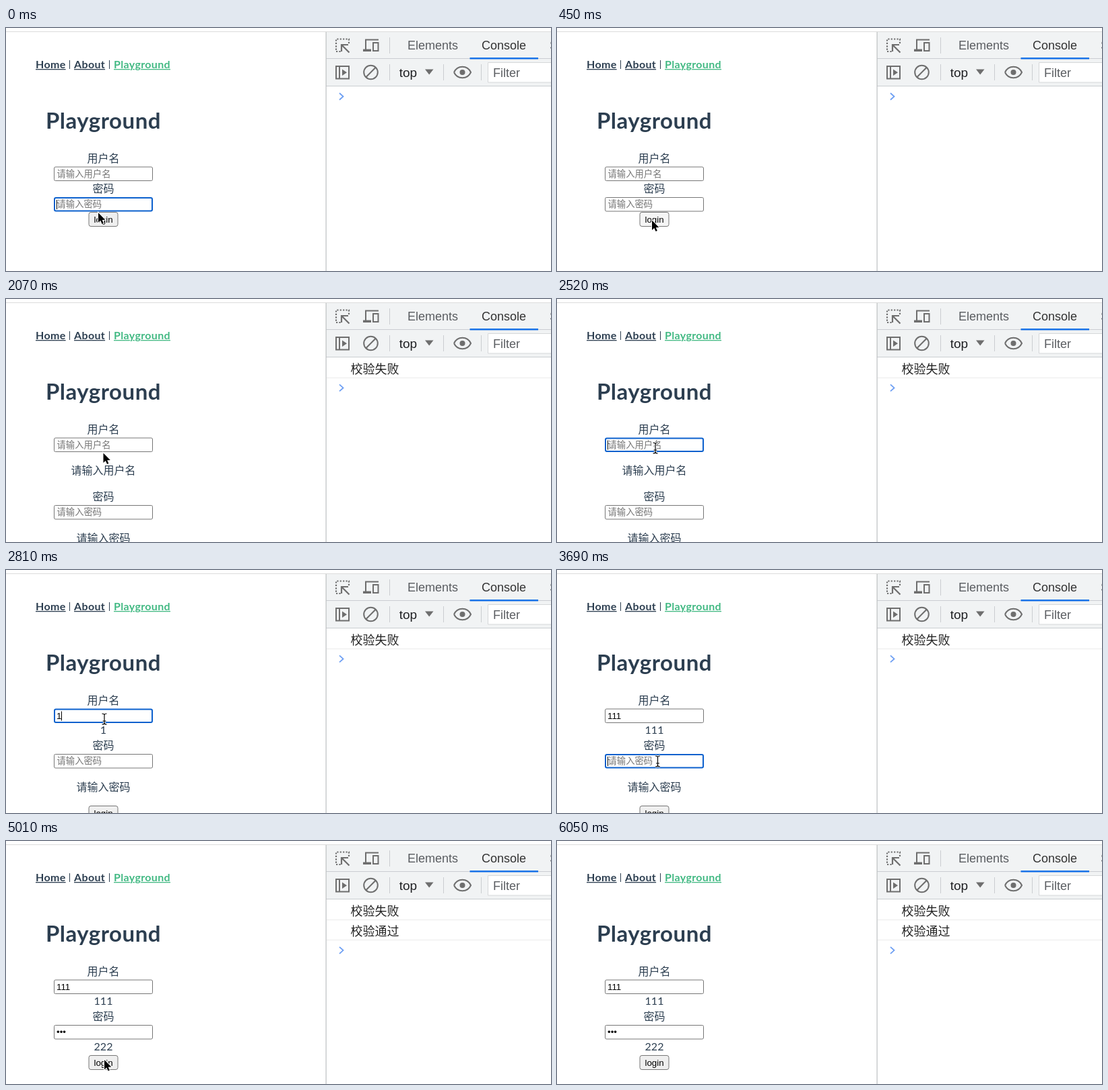
Animation, 809 px wide and 362 px high, one loop 6.8 s. Source, as an HTML page with a canvas:

```html
<!DOCTYPE html>
<html lang="zh">
<head>
<meta charset="utf-8">
<title>Playground</title>
<style>
  html, body { margin: 0; width: 100%; height: 100%; overflow: hidden; background: #fff; }
  canvas { display: block; width: 809px; height: 362px; }
</style>
</head>
<body>
<canvas id="stage"></canvas>
<script>
const W = 809, H = 362, LOOP = 6800;
const canvas = document.getElementById('stage');
const ratio = window.devicePixelRatio || 1;
canvas.width = W * ratio;
canvas.height = H * ratio;
const ctx = canvas.getContext('2d');

const CJK = '"Noto Sans CJK SC", "Noto Sans CJK", sans-serif';
const UI = '"Liberation Sans", Arial, sans-serif';
const PAGE = 'Lato, "Noto Sans CJK SC", sans-serif';
const INK = '#2c3e50', GREEN = '#42b983', ICON = '#6e6e6e';
const MID = 144.5;

// Each entry changes part of the state at its time (ms).
const steps = [
  [0, { x: 137, y: 275.3, cursor: 'arrow', focus: 2, pressed: false, user: '', pass: '', errors: false, logs: 0 }],
  [150, { x: 139, y: 281 }],
  [300, { x: 141, y: 286.5 }],
  [450, { focus: 0, pressed: true }],
  [590, { errors: true, logs: 1, pressed: false }],
  [1490, { x: 143.5 }],
  [1780, { x: 144, y: 271 }],
  [1930, { x: 144.5, y: 241 }],
  [2070, { y: 229.5 }],
  [2220, { x: 146, y: 223, cursor: 'beam' }],
  [2370, { focus: 1 }],
  [2520, { y: 222 }],
  [2810, { user: '1' }],
  [3110, { user: '11' }],
  [3260, { user: '111' }],
  [3400, { x: 148, y: 246 }],
  [3550, { x: 149.5, y: 281 }],
  [3690, { y: 285, focus: 2 }],
  [3990, { pass: '2' }],
  [4140, { pass: '22' }],
  [4290, { pass: '222' }],
  [4440, { y: 302 }],
  [4580, { x: 148, y: 314, cursor: 'arrow' }],
  [4730, { x: 146, y: 326 }],
  [4870, { focus: 0, pressed: true }],
  [5010, { logs: 2, pressed: false }],
  [5460, { x: 178, y: 333 }],
  [5600, { x: 335, y: 327 }],
  [5750, { x: 492, y: 306 }],
  [5900, { x: 580, y: 292 }],
  [6050, { cursor: '' }]
];

function stateAt(time) {
  return Object.assign({}, ...steps.filter(s => s[0] <= time).map(s => s[1]));
}

function text(str, x, y, font, color, align = 'left') {
  ctx.font = font;
  ctx.fillStyle = color;
  ctx.textAlign = align;
  ctx.fillText(str, x, y);
}

function rect(x, y, w, h, color) {
  ctx.fillStyle = color;
  ctx.fillRect(x, y, w, h);
}

function path(points, close) {
  ctx.beginPath();
  points.forEach(([x, y], i) => i ? ctx.lineTo(x, y) : ctx.moveTo(x, y));
  if (close) ctx.closePath();
}

function stroke(color, width) {
  ctx.strokeStyle = color;
  ctx.lineWidth = width;
  ctx.stroke();
}

function line(points, color, width) {
  path(points);
  stroke(color, width);
}

function shape(points, color) {
  path(points, true);
  ctx.fillStyle = color;
  ctx.fill();
}

function circle(x, y, r) {
  ctx.beginPath();
  ctx.arc(x, y, r, 0, Math.PI * 2);
}

function box(x, y, w, h, r, fill, border, width) {
  const d = width / 2;
  ctx.beginPath();
  ctx.roundRect(x + d, y + d, w - width, h - width, r);
  ctx.fillStyle = fill;
  ctx.fill();
  stroke(border, width);
}

function link(str, x, color) {
  ctx.font = 'bold 16px ' + PAGE;
  ctx.letterSpacing = '0.35px';
  ctx.textAlign = 'left';
  rect(x, 61, ctx.measureText(str).width, 1.3, color);
  // Leave a gap in the underline around descenders.
  ctx.strokeStyle = '#fff';
  ctx.lineWidth = 2;
  ctx.strokeText(str, x, 60);
  text(str, x, 60, ctx.font, color);
  ctx.letterSpacing = '0px';
}

function title(str) {
  ctx.letterSpacing = '0.5px';
  text(str, MID, 150, 'bold 33px ' + PAGE, INK, 'center');
  ctx.letterSpacing = '0px';
}

function input(y, value, hint, focused) {
  const font = '13.333px ' + UI;
  box(71, y, 147, 21.5, 2, '#fff', focused ? '#0b60cd' : '#767676', focused ? 2 : 1);
  if (value) text(value, 75, y + 15.3, font, '#000');
  else text(hint, 75.5, y + 15.4, '13.333px ' + CJK, '#757575');
  if (focused) {
    ctx.font = font;
    rect(Math.round(75 + ctx.measureText(value).width), y + 4, 1, 14, '#000');
  }
}

// Draws the line under a field and returns the height it takes.
function message(y, value, hint, errors) {
  if (value) {
    text(value, MID, y + 16.3, '16px ' + PAGE, INK, 'center');
    return 22.3;
  }
  if (!errors) return 0;
  text(hint, MID, y + 33.3, '16px ' + CJK, INK, 'center');
  return 55;
}

function loginButton(y, pressed) {
  box(122.5, y, 44, 22, 3, pressed ? '#f5f5f5' : '#efefef', '#767676', 1);
  text('login', MID, y + 15.8, '13.333px ' + UI, '#000', 'center');
}

function drawPage(s) {
  link('Home', 44, INK);
  link('About', 101, INK);
  link('Playground', 160, GREEN);
  rect(94, 48, 1, 13, INK);
  rect(153, 48, 1, 13, INK);
  title('Playground');

  const label = (str, y) => text(str, MID, y, '16px ' + CJK, INK, 'center');
  label('用户名', 200);
  input(206.5, s.user, '请输入用户名', s.focus === 1);
  let y = message(228, s.user, '请输入用户名', s.errors);
  label('密码', 245 + y);
  input(Math.round(252 + y), '•'.repeat(s.pass.length), '请输入密码', s.focus === 2);
  y += message(273.5 + y, s.pass, '请输入密码', s.errors);
  loginButton(Math.round(274 + y), s.pressed);
}

function inspectIcon() {
  ctx.setLineDash([2.2, 2.2]);
  line([[509, 23], [509, 16.5], [490, 16.5], [490, 35], [497, 35]], ICON, 2.2);
  ctx.setLineDash([]);
  line([[508, 25], [498, 25], [498, 35]], ICON, 2.2);
  line([[498, 25], [509.5, 36.5]], ICON, 2.2);
}

function deviceIcon() {
  line([[553, 17.5], [534, 17.5], [534, 32]], ICON, 2);
  rect(530, 31.5, 12, 3.5, ICON);
  ctx.strokeStyle = ICON;
  ctx.strokeRect(545, 22, 7.5, 12);
}

function sidebarIcon() {
  ctx.strokeStyle = ICON;
  ctx.lineWidth = 2;
  ctx.strokeRect(490, 57, 19, 18.5);
  rect(494, 57, 2, 18.5, ICON);
  shape([[499, 61.5], [506, 66.2], [499, 71]], ICON);
}

function clearIcon() {
  circle(541.5, 66, 10.3);
  stroke(ICON, 2);
  line([[534.3, 73.2], [548.7, 58.8]], ICON, 2);
}

function eyeIcon() {
  ctx.beginPath();
  ctx.moveTo(665, 66);
  ctx.bezierCurveTo(670, 55, 685, 55, 690, 66);
  ctx.bezierCurveTo(685, 77, 670, 77, 665, 66);
  stroke(ICON, 2);
  circle(677.5, 66, 4);
  ctx.fillStyle = ICON;
  ctx.fill();
}

function drawTools(s) {
  const edge = '#cacdd1';
  rect(475, 6, W - 475, 80, '#f1f3f4');
  rect(0, 5, W, 1, '#dcdcdc');
  rect(475, 45, W - 475, 1, edge);
  rect(475, 86, W - 475, 1, edge);
  rect(474.5, 6, 1.2, H, '#bdbfc1');
  rect(688.5, 44, 101.5, 2.5, '#1a73e8');
  for (const [x, y] of [[569, 14], [569, 54], [649, 54], [705, 54]]) rect(x, y, 1, 24, edge);

  inspectIcon();
  deviceIcon();
  sidebarIcon();
  clearIcon();
  eyeIcon();
  text('Elements', 596, 32, '18px ' + UI, '#5a5d61');
  text('Console', 706, 32, '18px ' + UI, '#333');
  text('Sources', 807, 32, '18px ' + UI, '#5a5d61');
  text('top', 583.7, 73, '19px ' + UI, '#202124');
  shape([[622, 61.5], [634.5, 61.5], [628.2, 69.5]], ICON);
  box(715, 51, 120, 30.5, 0, '#fff', '#d5d7d9', 1);
  text('Filter', 723, 73, '18px ' + UI, '#5a5d61');

  ['校验失败', '校验通过'].slice(0, s.logs).forEach((log, i) => {
    text(log, 511.5, 110.5 + i * 30, '18px ' + CJK, '#222');
    rect(476, 117 + i * 30, W - 476, 1, '#ebebeb');
  });
  const y = 102 + s.logs * 30.4;
  line([[495, y - 5], [500.5, y], [495, y + 5]], '#6d9ff3', 1.8);
}

function arrow() {
  path([[0, 0], [0, 14.5], [3.3, 11.4], [5.6, 16.6], [7.9, 15.6], [5.7, 10.7], [10.3, 10.4]], true);
  stroke('#fff', 2);
  ctx.fillStyle = '#000';
  ctx.fill();
}

function beam() {
  ctx.beginPath();
  for (const d of [-1, 1]) {
    ctx.moveTo(-3.5, 8 * d);
    ctx.quadraticCurveTo(0, 8 * d, 0, 6 * d);
    ctx.quadraticCurveTo(0, 8 * d, 3.5, 8 * d);
  }
  ctx.moveTo(0, -6.5);
  ctx.lineTo(0, 6.5);
  ctx.moveTo(-2.5, 3);
  ctx.lineTo(2.5, 3);
  stroke('#fff', 3);
  stroke('#000', 1.2);
}

function drawCursor(s) {
  if (!s.cursor) return;
  ctx.save();
  ctx.translate(s.x, s.y);
  (s.cursor === 'beam' ? beam : arrow)();
  ctx.restore();
}

function draw(time) {
  const s = stateAt(time);
  ctx.setTransform(ratio, 0, 0, ratio, 0, 0);
  rect(0, 0, W, H, '#fff');
  drawPage(s);
  drawTools(s);
  drawCursor(s);
}

const start = performance.now();
function tick() {
  draw((performance.now() - start) % LOOP);
  requestAnimationFrame(tick);
}
tick();
</script>
</body>
</html>
```
